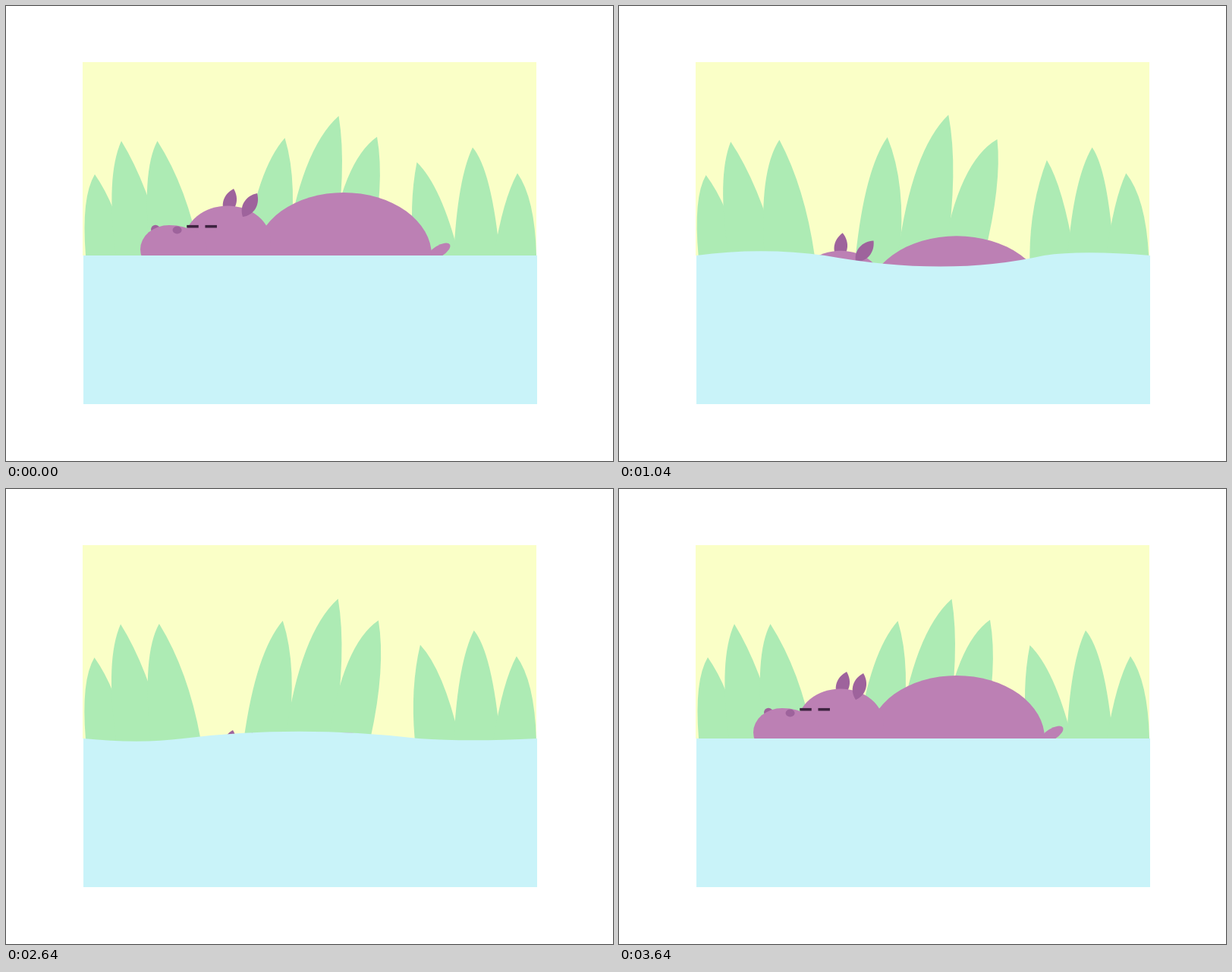
These frames come from a looping animation (800x600 px, 3840 ms). An HTML page with a canvas:

```html
<!DOCTYPE html>
<html>
<head>
<meta charset="utf-8">
<title>Hippo</title>
<style>
html, body { margin: 0; width: 100%; height: 100%; overflow: hidden; background: #fff }
canvas { display: block }
</style>
</head>
<body>
<canvas id="stage" width="800" height="600"></canvas>
<script>
const ctx = document.getElementById('stage').getContext('2d');
const LOOP = 3840, STEP = 40, LAST = 3640, LEVEL = 329;
const SKY = '#faffc7', GRASS = '#adebb4', WATER = '#c9f3f9';
const SKIN = '#bc80b4', DARK = '#9e639c', EYE = '#3d2340';

// base left x, left control, tip, right control, base right x, sway x, sway y, settle time
const leaves = [
  [105, 99, 252, 117, 222, 145, 262, 160, -2.5, 1, 280],
  [145, 131, 225, 152, 178, 187, 235, 210, -5, 1, 280],
  [190, 178, 218, 199.5, 178, 239, 240, 256, 12.5, -1.5, 340],
  [314, 331, 215, 367.5, 174, 386, 235, 372, -14.5, -1, 280],
  [368, 388, 190, 438.5, 145, 450, 215, 432, -4.5, -1.5, 280],
  [425, 443, 205, 489, 172.5, 500, 235, 480, 10, 3.5, 480],
  [538, 530.5, 262, 541.5, 206, 574, 238, 597, 23.5, -3, 280],
  [590, 595, 228, 615, 186.5, 640, 216, 651, 9, 0, 280],
  [643, 655, 255, 674, 220.5, 697, 253, 699, -6, 0, 320]
];
const waveKeys = [[0, 0], [560, 0], [1000, 16], [1320, -18], [1660, 0],
  [2240, 0], [2540, -18], [2840, 16], [3240, 0], [LOOP, 0]];

const lerp = (a, b, p) => a + (b - a) * p;
const ramp = (t, from, to) => Math.min(1, Math.max(0, (t - from) / (to - from)));
const smooth = (t, from, to) => {
  const p = ramp(t, from, to);
  return p * p * (3 - 2 * p);
};
const bump = (t, mid, rise, fall = rise) => {
  const p = (t - mid) / (t < mid ? rise : fall);
  return Math.abs(p) < 1 ? Math.cos(p * Math.PI / 2) ** 2 : 0;
};
const sway = (t, settle) => bump(t, 1080, 280, settle) + bump(t, 2840, 280, settle);

function waveAt(t) {
  const i = waveKeys.findIndex(k => k[0] > t);
  const [t0, a] = waveKeys[i - 1], [t1, b] = waveKeys[i];
  return lerp(a, b, smooth(t, t0, t1));
}

function sinkAt(t) {
  return t < 2000 ? 95 * ramp(t, 570, 1120) ** 3 : 95 * (1 - smooth(t, 2480, 3060));
}

function breathAt(t) {
  return t < 2000 ? smooth(t, 0, 560) : (1 - ramp(t, 3200, 3640)) ** 2;
}

function ellipse(color, x, y, rx, ry, turn = 0) {
  ctx.fillStyle = color;
  ctx.beginPath();
  ctx.ellipse(x, y, rx, ry, turn * Math.PI / 180, 0, 7);
  ctx.fill();
}

function drawLeaf([bl, lx, ly, tx, ty, rx, ry, br, dx, dy, settle], t) {
  const s = sway(t, settle);
  const mid = dx * s * .5, low = dx * s * .15;
  ctx.beginPath();
  ctx.moveTo(bl + low, 350);
  ctx.lineTo(bl + low, LEVEL);
  ctx.quadraticCurveTo(lx + mid, ly, tx + dx * s, ty + dy * s);
  ctx.quadraticCurveTo(rx + mid, ry, br + low, LEVEL);
  ctx.lineTo(br + low, 350);
  ctx.fill();
}

function drawEar(x, y, degrees) {
  ctx.save();
  ctx.translate(x, y);
  ctx.rotate(degrees * Math.PI / 180);
  ctx.fillStyle = DARK;
  ctx.beginPath();
  ctx.moveTo(0, 0);
  ctx.bezierCurveTo(-12, -10, -11, -26, 0, -36.4);
  ctx.bezierCurveTo(11, -26, 12, -10, 0, 0);
  ctx.fill();
  ctx.restore();
}

function drawHippo(t) {
  const b = breathAt(t), flap = sway(t, 280);
  const wag = bump(t, 280, 280) + bump(t, 3160, 200);
  ctx.save();
  ctx.translate(0, sinkAt(t));

  ellipse(SKIN, lerp(570.5, 572, wag), lerp(323.5, 325, wag), 17, 7.3, lerp(-32, -15, wag));
  ellipse(SKIN, 445, LEVEL, 116 + 3 * b, 83 + 2 * b);
  drawEar(290, 276, 16 - 9 * flap);
  ellipse(DARK, 197 - .4 * b, 294.6 - .2 * b, 6 + 1.5 * b, 5.8 + 1.5 * b);
  ellipse(SKIN, 292, 310.5, 57, 47);

  // snout: rounder on the left, longer towards the head
  ctx.beginPath();
  ctx.ellipse(215, 321, 38, 32, 0, Math.PI / 2, Math.PI * 1.5);
  ctx.ellipse(215, 321, 50, 32, 0, -Math.PI / 2, Math.PI / 2);
  ctx.fill();
  ctx.fillRect(215, 321, 230, 60);

  ellipse(DARK, 225.6, 295.5 + .3 * b, 6 + 2 * b, 5 + 1.5 * b);
  drawEar(312, 278, 16 + 15.5 * (1 - smooth(t, 0, 240)) + 25.5 * flap);
  ctx.fillStyle = EYE;
  const w = 15.5 + 1.5 * b;
  for (const x of [246, 270.2]) ctx.fillRect(x - w / 2, 288.9 + .3 * b, w, 3.6);
  ctx.restore();
}

function drawWater(a) {
  const x1 = 248 + 1.6 * a, x2 = 550 + .7 * a;
  ctx.fillStyle = WATER;
  ctx.beginPath();
  ctx.moveTo(102, LEVEL);
  ctx.quadraticCurveTo(180 + .5 * a, LEVEL - .8 * a, x1, LEVEL);
  ctx.quadraticCurveTo(402 + 2 * a, LEVEL + 2 * a, x2, LEVEL);
  ctx.quadraticCurveTo(610, LEVEL - .5 * a, 700, LEVEL);
  ctx.lineTo(700, 525);
  ctx.lineTo(102, 525);
  ctx.fill();
}

function draw(now) {
  const t = Math.min(LAST, Math.floor(now % LOOP / STEP) * STEP);
  ctx.fillStyle = '#fff';
  ctx.fillRect(0, 0, 800, 600);
  ctx.fillStyle = SKY;
  ctx.fillRect(101, 74, 598, LEVEL - 74);
  ctx.fillRect(102, LEVEL, 597, 25);
  ctx.fillStyle = GRASS;
  for (const leaf of leaves) drawLeaf(leaf, t);
  drawHippo(t);
  drawWater(waveAt(t));
}

const start = performance.now();
function tick() {
  draw(performance.now() - start);
  requestAnimationFrame(tick);
}
tick();
</script>
</body>
</html>
```
